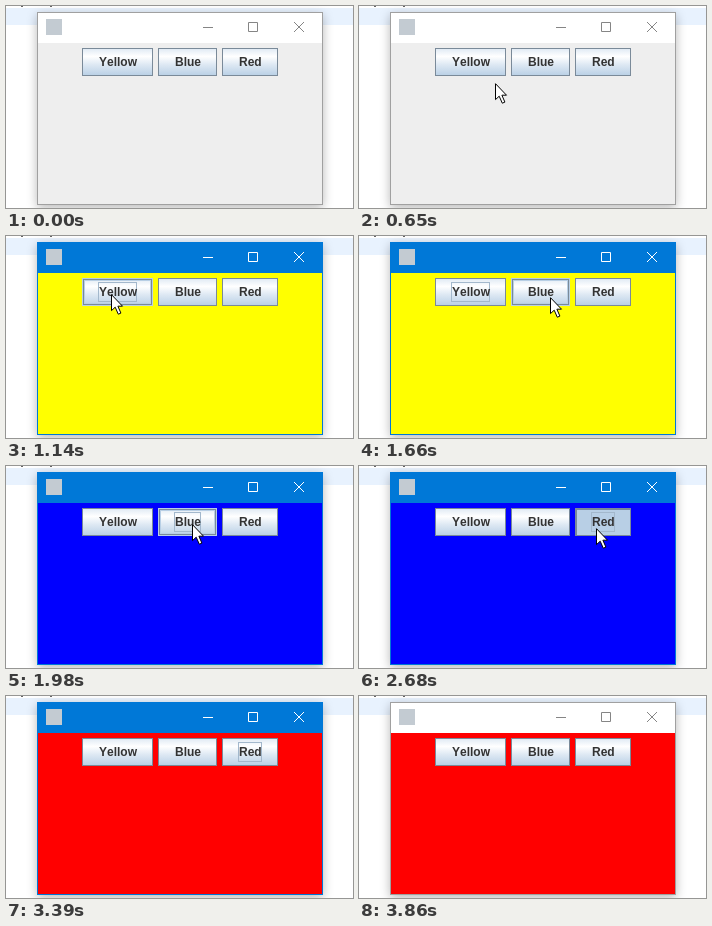
An HTML page for the animation above (4020 ms loop, 347 by 202 pixels).

```html
<!DOCTYPE html>
<html lang="en">
<head>
<meta charset="utf-8">
<title>Colour buttons</title>
<style>
html, body { margin: 0; width: 100%; height: 100%; overflow: hidden; background: #fff; }
.stage { position: relative; width: 347px; height: 202px; overflow: hidden; background: #fff; }
.stage * { position: absolute; box-sizing: border-box; }
.stage, .stage * { animation: 4.02s step-end infinite; }

.line { left: 0; top: 2px; width: 347px; height: 17px; background: #e8f2fe; }
.marks { left: 15px; top: 0; width: 2px; height: 1px; background: #666; box-shadow: 29px 0 #666; }

.win { left: 31px; top: 6px; width: 286px; height: 193px; border: 1px solid #a0a0a0;
  box-shadow: 0 3px 10px rgba(0,0,0,.28); animation-name: frame; }
.bar { left: 0; top: 0; width: 284px; height: 30px; background: #fff; color: #858585; animation-name: bar; }
.icon { left: 8px; top: 6px; width: 16px; height: 16px; background: #c3cbd2; }
.bar svg { left: 0; top: 0; fill: none; stroke: currentColor; }
.pane { left: 0; top: 30px; width: 284px; height: 161px; background: #eee; animation-name: pane; }

.btn { top: 42px; height: 28px; font: bold 12px/28px "Liberation Sans", Arial, sans-serif;
  font-kerning: none; color: #333; box-shadow: inset 0 0 0 1px #7a8a99;
  background: linear-gradient(#dde8f3, #fff 30%, #dde8f3 60%, #b8cfe5); }
.btn i { inset: 0; opacity: 0; }
.btn span { left: 17px; top: 0; white-space: nowrap; }
.over { box-shadow: inset 0 0 0 1px #b8cfe5, inset 0 0 0 2px #7a8a99, inset 0 0 0 3px #b8cfe5; }
.down { background: #b8cfe5; box-shadow: inset 0 0 0 1px #7a8a99, inset 2px 2px #7a8a99; }
.btn .focus { inset: 4px 16px; border: 1px solid #a3b8cc; }

.yellow { left: 76px; width: 71px; }
.blue { left: 152px; width: 59px; }
.red { left: 216px; width: 56px; }
.yellow .over { animation-name: y-over; }
.yellow .down { animation-name: y-down; }
.yellow .focus { animation-name: y-focus; }
.blue .over { animation-name: b-over; }
.blue .down { animation-name: b-down; }
.blue .focus { animation-name: b-focus; }
.red .over { animation-name: r-over; }
.red .down { animation-name: r-down; }
.red .focus { animation-name: r-focus; }

.cursor { left: 0; top: 0; width: 12px; height: 21px; overflow: visible; animation-name: move; }

@keyframes frame {
  0%, 96.01%, 100% { border-color: #a0a0a0; }
  26.61% { border-color: #0078d7; }
}
@keyframes bar {
  0%, 96.01%, 100% { background: #fff; color: #858585; }
  26.61% { background: #0078d7; color: #fff; }
}
@keyframes pane {
  0%, 100% { background: #eee; }
  28.35% { background: #ff0; }
  49.25% { background: #00f; }
  70.64% { background: #f00; }
}
@keyframes y-over { 0%, 35.57%, 100% { opacity: 0; } 16.66% { opacity: 1; } }
@keyframes y-down { 0%, 28.35%, 100% { opacity: 0; } 26.61% { opacity: 1; } }
@keyframes y-focus { 0%, 45.27%, 100% { opacity: 0; } 26.61% { opacity: 1; } }
@keyframes b-over { 0%, 57.21%, 100% { opacity: 0; } 37.56% { opacity: 1; } }
@keyframes b-down { 0%, 49.25%, 100% { opacity: 0; } 45.27% { opacity: 1; } }
@keyframes b-focus { 0%, 66.66%, 100% { opacity: 0; } 45.27% { opacity: 1; } }
@keyframes r-over { 0%, 74.62%, 100% { opacity: 0; } 59.2% { opacity: 1; } }
@keyframes r-down { 0%, 70.64%, 100% { opacity: 0; } 66.66% { opacity: 1; } }
@keyframes r-focus { 0%, 96.01%, 100% { opacity: 0; } 66.66% { opacity: 1; } }

@keyframes move {
  0%, 84.32%, 100% { transform: translate(320px, 210px); }
  /* in from below to Yellow */
  6.96% { transform: translate(262px, 189px); }
  8.95% { transform: translate(238px, 161px); }
  10.94% { transform: translate(205px, 128px); }
  12.68% { transform: translate(169px, 99px); }
  14.67% { transform: translate(136px, 77px); }
  16.66% { transform: translate(113px, 63px); }
  18.65% { transform: translate(106px, 58px); }
  20.14% { transform: translate(105px, 58px); }
  /* across to Blue */
  32.08% { transform: translate(112px, 64px); }
  33.83% { transform: translate(129px, 68px); }
  35.57% { transform: translate(151px, 68px); }
  37.56% { transform: translate(183px, 67px); }
  41.29% { transform: translate(191px, 61px); }
  43.53% { transform: translate(186px, 58px); }
  /* across to Red */
  53.48% { transform: translate(190px, 59px); }
  55.47% { transform: translate(201px, 60px); }
  57.21% { transform: translate(214px, 61px); }
  59.2% { transform: translate(229px, 62px); }
  61.19% { transform: translate(237px, 62px); }
  /* out at the lower right */
  74.62% { transform: translate(244px, 73px); }
  76.61% { transform: translate(261px, 98px); }
  78.6% { transform: translate(283px, 132px); }
  80.34% { transform: translate(304px, 164px); }
  82.33% { transform: translate(319px, 190px); }
}
</style>
</head>
<body>
<div class="stage">
  <div class="line"></div>
  <div class="marks"></div>
  <div class="win">
    <div class="bar">
      <div class="icon"></div>
      <svg width="284" height="30">
        <path d="M165 14.5h10M210.5 9.5h9v9h-9zM256 9l10 10M266 9l-10 10"/>
      </svg>
    </div>
    <div class="pane"></div>
  </div>
  <div class="btn yellow"><i class="over"></i><i class="down"></i><i class="focus"></i><span>Yellow</span></div>
  <div class="btn blue"><i class="over"></i><i class="down"></i><i class="focus"></i><span>Blue</span></div>
  <div class="btn red"><i class="over"></i><i class="down"></i><i class="focus"></i><span>Red</span></div>
  <svg class="cursor" viewBox="0 0 12 21">
    <path d="M.5.7V16.6L4.2 13.2L7.3 20.2L9.9 19.1L6.9 12.2H11.5Z" fill="#fff" stroke="#000"/>
  </svg>
</div>
</body>
</html>
```
